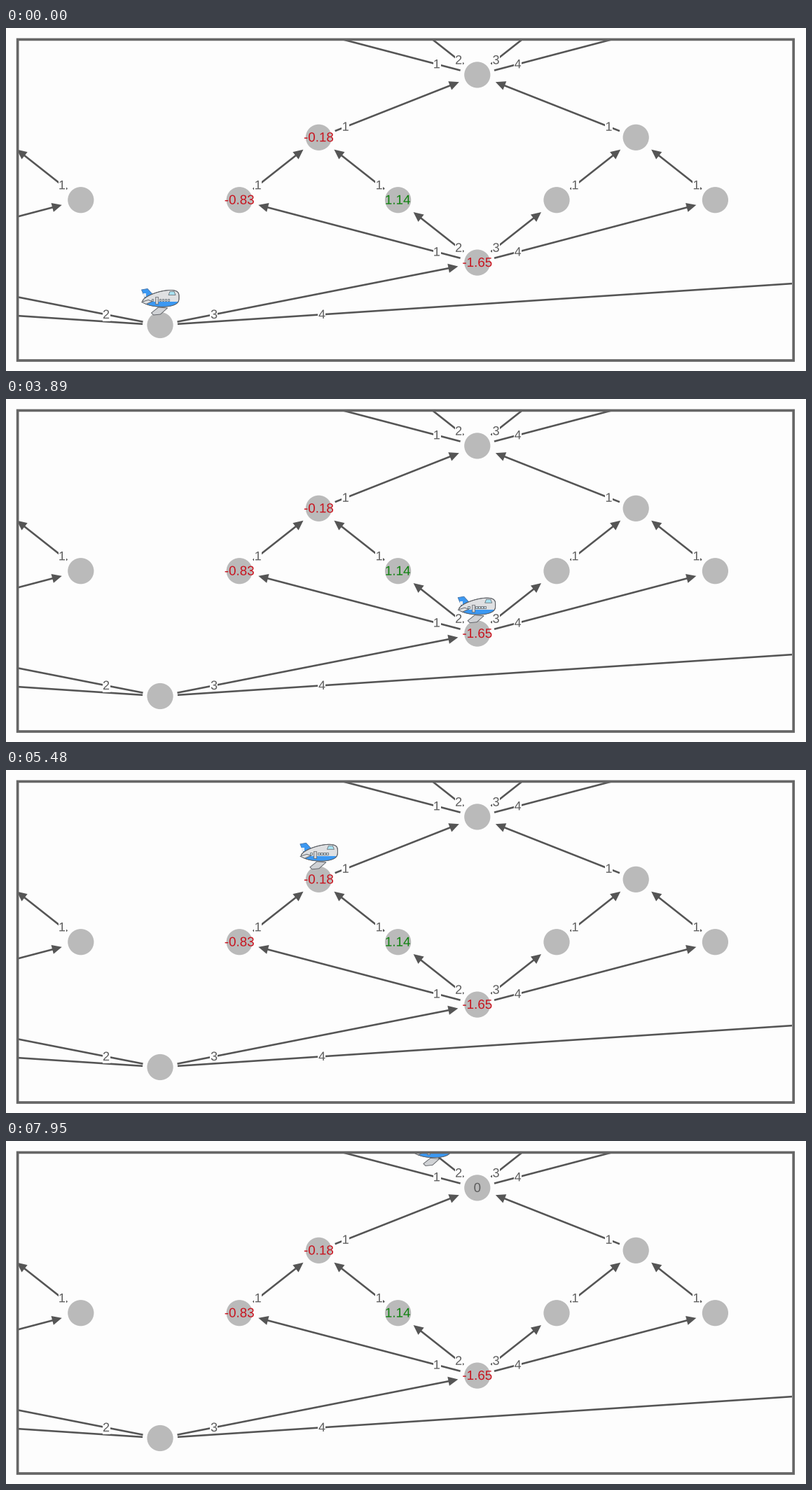
Recreate the animation shown at these times as a matplotlib script. Size 1142 by 490 pixels, loop 8000 ms.

```python
import numpy as np
import matplotlib.pyplot as plt
from matplotlib.animation import FuncAnimation
from matplotlib.collections import PolyCollection
from matplotlib.patches import Circle, PathPatch, Polygon, Rectangle
from matplotlib.path import Path
from matplotlib.textpath import TextPath
from matplotlib.transforms import Affine2D

W, H, DPI = 1142, 490, 100
LEFT, TOP, RIGHT, BOTTOM = 18, 18, 1122, 473
PX = 72 / DPI
BG, LINE, NODE, TEXT = "#fdfdfd", "#555555", "#bababa", "#5e5e5e"
RED, GREEN = "#c8141f", "#0f820f"
LOOP, STEP, GLIDE, REFRESH = 8000, 20, 500, 50

fig = plt.figure(figsize=(W / DPI, H / DPI), dpi=DPI, facecolor=BG)
fig.add_artist(Rectangle((16.6 / W, 1 - 475 / H), 1107.6 / W, 458.6 / H, snap=False,
                         fill=False, ec="#666666", lw=3.7 * PX))
ax = fig.add_axes([LEFT / W, 1 - BOTTOM / H, (RIGHT - LEFT) / W, (BOTTOM - TOP) / H])
ax.set_axis_off()


def pos(col, row):
    """Pixel centre of a node on the grid."""
    return np.array([220 + 113.2 * col, 424.5 - 89.4 * row])


def glyphs(s, center, size):
    p = TextPath((0, 0), s, size=size, prop={"family": "Liberation Sans"})
    box = p.get_extents()
    move = Affine2D().translate(-(box.x0 + box.x1) / 2, -(box.y0 + box.y1) / 2)
    return move.scale(1, -1).translate(center[0], center[1] - 0.5).transform_path(p)


def strip(a, b, n, half):
    return np.array([a + half * n, b + half * n, b - half * n, a - half * n])


# The root fans out to four hubs; each hub fans out again and its
# branches merge pairwise into the next hub three rows higher.
edges, cells = [], {(0, 0)}


def fan(col, row, gap):
    for i in range(4):
        edges.append(((col, row), (col + gap * (2 * i - 3), row + 1), str(i + 1)))


fan(0, 0, 4)
for hub in (-12, -4, 4, 12):
    for row in (1, 4):
        fan(hub, row, 1)
    for side in (-2, 2):
        for d in (-1, 1):
            edges.append(((hub + side + d, 2), (hub + side, 3), "1"))
        edges.append(((hub + side, 3), (hub, 4), "1"))
for a, b, _ in edges:
    cells |= {a, b}

shapes, colors, labels = [], [], []
for a, b, name in edges:
    p, q = pos(*a), pos(*b)
    u = (q - p) / np.hypot(*(q - p))
    n = np.array([-u[1], u[0]])
    tip = q - 28 * u
    foot = tip - 14 * u
    spot = p + u * max(34, 15.2 / abs(u[1]))
    box = strip(spot - [5.5, 0], spot + [5.5, 0], np.array([0, 1]), 10)
    shapes += [strip(p + 25 * u, foot + u, n, 1.3),
               np.array([tip, foot + 6.6 * n, foot - 6.6 * n]), box]
    colors += [LINE, LINE, BG]
    labels.append(glyphs(name, spot, 18))

ax.add_collection(PolyCollection(shapes, facecolors=colors, edgecolors="none"))
ax.add_patch(PathPatch(Path.make_compound_path(*labels), fc=TEXT, ec="none", zorder=3))
for cell in cells:
    x, y = pos(*cell)
    if LEFT - 20 < x < RIGHT + 20 and TOP - 20 < y < BOTTOM:
        ax.add_patch(Circle((x, y), 18.6, fc=NODE, ec="none", zorder=4))


def value(s, cell, color):
    return ax.add_patch(PathPatch(glyphs(s, pos(*cell), 18.8), fc=color, ec="none", zorder=5))


value("-1.65", (4, 1), RED)
value("-0.83", (1, 2), RED)
value("1.14", (3, 2), GREEN)
value("-0.18", (2, 3), RED)
zero = value("0", (4, 4), TEXT)

# Plane, drawn relative to the centre of the node below it
shift = Affine2D()
GREY, SHADE, BLUE, GLASS, INK = "#dfe0e2", "#d0d2d5", "#3b98f2", "#a9e2f2", "#5c5f64"


def part(pts, fc, ec=INK, lw=0.9):
    poly = Polygon(pts, closed=True, fc=fc, ec=ec, lw=lw * PX, joinstyle="round", zorder=6)
    poly.set_transform(shift + ax.transData)
    return ax.add_patch(poly)


def block(x, y, w, h):
    return [(x - w / 2, y - h / 2), (x + w / 2, y - h / 2),
            (x + w / 2, y + h / 2), (x - w / 2, y + h / 2)]


# Spindle hull: thin at the tail, blunt at the nose
s = (1 - np.cos(np.linspace(0, np.pi, 40))) / 2
mid, girth = -34.5 - 5.5 * s, 20.5 * s ** 0.6 * (1 - s) ** 0.3
xs = -25 + 52 * s
hull = np.concatenate([np.c_[xs, mid - girth], np.c_[xs, mid + girth][::-1]])

part([(-26.5, -50.5), (-18, -52), (-9, -42), (-20, -35)], BLUE, "#4a78ab")
part(block(-22, -43, 4, 5), "#e6ebf1", "none")
part(hull, GREY)
belly = part(block(0, -25, 60, 17), BLUE, "none")
belly.set_clip_path(Polygon(hull, closed=True, transform=shift + ax.transData))
part(hull, "none")
part([(-26.5, -33), (-17, -36), (-11, -34), (-20, -30)], GREY)
part([(12, -43), (14, -48), (20, -48), (22, -43)], GLASS, lw=0.7)
part(block(-5, -35.5, 4, 10), SHADE, lw=0.7)
for x in (-11, 0, 4, 8, 12):
    part(block(x, -36.5, 2.8, 3), "#c9dfe8", lw=0.7)
part([(-12.5, -17.5), (-2.5, -25.5), (10.5, -24.5), (0.5, -15.5), (-9.5, -14.5)], SHADE)

ax.set_xlim(LEFT, RIGHT)
ax.set_ylim(BOTTOM, TOP)

# Each leg: next cell, departure, first and last refresh of the picture
LEGS = [((4, 1), 1350, 1620, 1890), ((3, 2), 3822, 3890, 4350), ((2, 3), 4962, 5020, 5480),
        ((4, 4), 6158, 6230, 6650), ((1, 5), 7769, 7800, 7950)]
STALL = 1420
ARRIVED = LEGS[3][3]
ticks = np.array([0, STALL] + [t for _, _, first, last in LEGS
                               for t in (*range(first, last, REFRESH), last)])


def ease(t):
    t = min(max(t, 0), 1)
    return 4 * t ** 3 if t < 0.5 else 1 - 4 * (1 - t) ** 3


def update(i):
    t = ticks[ticks <= i * STEP + STEP / 2][-1]
    p = pos(0, 0)
    for cell, depart, *_ in LEGS:
        p = p + (pos(*cell) - p) * ease((t - depart) / GLIDE)
    shift.clear().translate(*p)
    zero.set_visible(bool(t >= ARRIVED))
    return []


anim = FuncAnimation(fig, update, frames=LOOP // STEP, interval=STEP,
                     init_func=lambda: [], repeat=True, repeat_delay=0)
plt.show()
```
